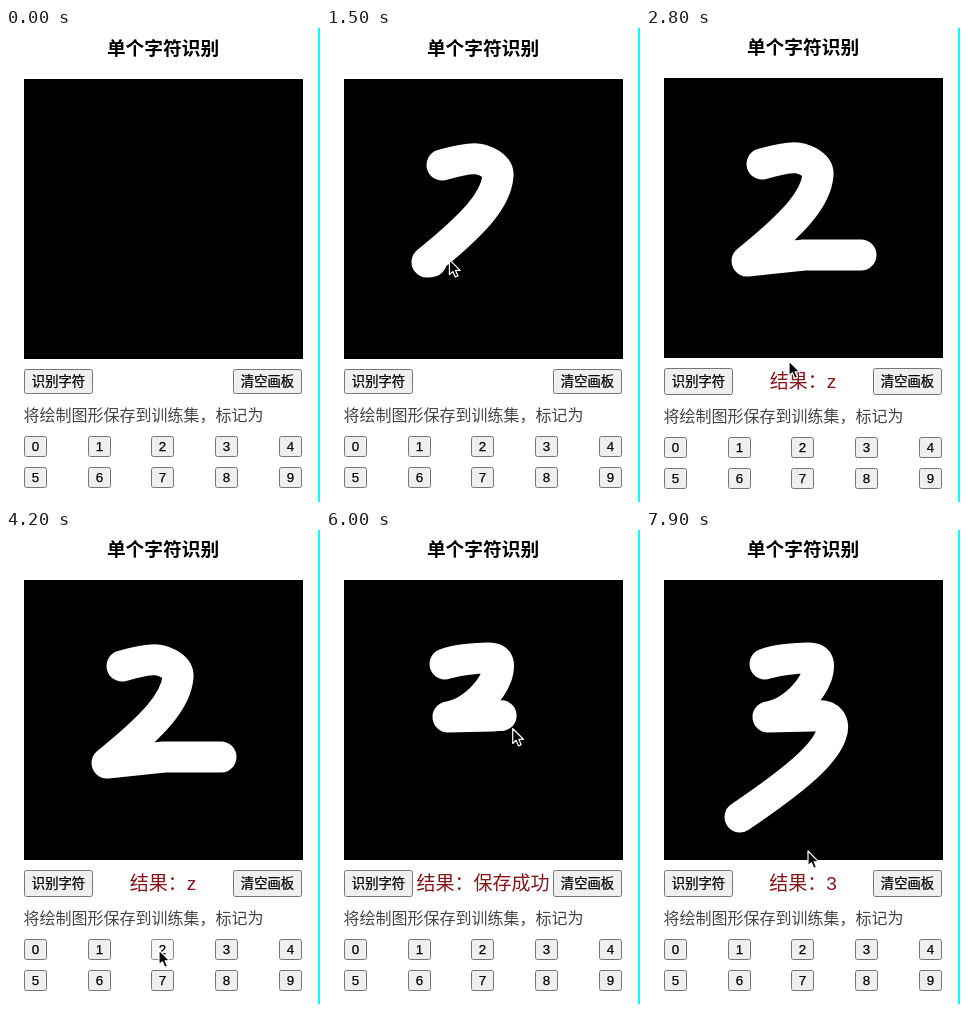
Animation, 314 px wide and 474 px high, one loop 8000 ms. Source, as an HTML page:

```html
<!DOCTYPE html>
<html lang="zh-CN">
<head>
<meta charset="utf-8">
<title>单个字符识别</title>
<style>
  html, body { margin: 0; width: 100%; height: 100%; overflow: hidden; background: #fff; }
  svg { display: block; width: 314px; height: 474px; }
  text { font-family: "Liberation Sans", "Noto Sans CJK SC", "Noto Sans CJK", sans-serif; text-anchor: middle; }
  .title { font-size: 18.72px; font-weight: bold; }
  .label { font-size: 16px; fill: #444; text-anchor: start; }
  .result { font-size: 19px; fill: #861418; }
  .button text { font-size: 13.33px; stroke: #000; stroke-width: .25; }
  .button rect { fill: #efefef; stroke: #767676; }
  .button.hover rect { fill: #e5e5e5; stroke: #4f4f4f; }
  .button.active rect { fill: #f5f5f5; stroke: #8d8d8d; }
  .pen { fill: none; stroke: #fff; stroke-width: 31; stroke-linecap: round; stroke-linejoin: round; }
  .cursor { stroke: #fff; stroke-width: 1.2; stroke-linejoin: round; }
</style>
</head>
<body>
<svg viewBox="0 0 314 474">
  <rect x="312" width="2" height="474" fill="#0ff"/>
  <g id="board">
    <text class="title" x="157" y="27">单个字符识别</text>
    <rect x="18" y="51" width="279" height="280"/>
    <path class="pen" id="two" d="M116 137C130 133 145 130 152 131S173 138 172 148C170 172 148 196 101 234L158 228H215"/>
    <path class="pen" id="three" d="M119 135C130 131 150 129 162 129S174 136 171 146C165 163 145 184 122 188L167 187C184 184 190 194 185 206C178 226 150 250 94 288"/>
  </g>
  <g id="actions"></g>
  <text class="result" id="result" x="157" y="360"></text>
  <g id="digits">
    <text class="label" x="17.5" y="393">将绘制图形保存到训练集，标记为</text>
  </g>
  <path class="cursor" id="cursor" d="M0 0V15L3.4 11.8L5.8 17.4L8.5 16.2L6.1 10.8H10.7Z"/>
</svg>
<script>
const LOOP = 8000, STEP = 100, PEN_LAG = 50, PRESS_TIME = 200;
const RESULT_AT = 2300, CLEAR_AT = 4400, SECOND_RESULT_AT = 7200;
const PRESSES = [2300, 4200, 7100];
const $ = id => document.getElementById(id);
const progress = (t, from, to) => Math.min(1, Math.max(0, (t - from) / (to - from)));
const setAttrs = (node, attrs) => Object.entries(attrs).forEach(([k, v]) => node.setAttribute(k, v));

function pen(id, from, to, hideAt) {
  const path = $(id), length = path.getTotalLength();
  return {
    from: from - PEN_LAG,
    place(_, t) {
      const { x, y } = path.getPointAtLength(length * progress(t + PEN_LAG, from, to));
      return [x, y];
    },
    draw(t) {
      path.style.visibility = t >= from && t < hideAt ? "visible" : "hidden";
      path.style.strokeDasharray = `${length * progress(t, from, to)} ${length * 2}`;
    }
  };
}

function glide(from, to, x, y) {
  return {
    from,
    place([x0, y0], t) {
      const k = progress(t, from, to), eased = k * k * (3 - 2 * k);
      return [x0 + (x - x0) * eased, y0 + (y - y0) * eased];
    }
  };
}

const two = pen("two", 1000, 1800, CLEAR_AT);
const three = pen("three", 5500, 6400, LOOP);
const moves = [
  glide(100, 950, 116, 137), two,
  glide(1850, 2200, 60, 352),
  glide(2500, 2800, 143, 333),
  glide(2900, 3900, 153, 420),
  glide(4600, 5200, 135, 259),
  glide(5200, 5450, 119, 135), three,
  glide(6400, 6500, 71, 284),
  glide(6500, 6800, 52, 352),
  glide(7300, 7700, 155, 352),
  glide(7700, 7900, 162, 321)
];
const pointerAt = t => moves.reduce((at, move) => t < move.from ? at : move.place(at, t), [250, 310]);

function addButton(parent, label, x, y, w, h) {
  const make = name => document.createElementNS("http://www.w3.org/2000/svg", name);
  const group = make("g"), rect = make("rect"), text = make("text");
  setAttrs(rect, { x: x + .5, y: y + .5, width: w - 1, height: h - 1, rx: 2 });
  setAttrs(text, { x: x + w / 2, y: y + h / 2 + 4.9 });
  text.textContent = label;
  group.append(rect, text);
  $(parent).append(group);
  return { group, rect, x, y, w, h };
}

const actions = ["识别字符", "清空画板"].map((label, i) => addButton("actions", label, 18 + i * 209, 341, 69, 25));
const digits = Array.from({ length: 10 }, (_, n) =>
  addButton("digits", n, Math.round(18 + n % 5 * 63.7), n < 5 ? 408 : 439, 23, 21));

function resultText(t) {
  if (t < RESULT_AT) return "";
  return "结果：" + (t < CLEAR_AT ? "z" : t < SECOND_RESULT_AT ? "保存成功" : "3");
}

function draw(t) {
  const [x, y] = pointerAt(t);
  two.draw(t);
  three.draw(t);
  $("result").textContent = resultText(t);
  $("cursor").setAttribute("transform", `translate(${x} ${y})`);
  $("cursor").style.visibility = t < 100 ? "hidden" : "visible";

  // The result line makes its row taller, pushing the rest apart.
  const grow = t >= RESULT_AT ? 1 : 0;
  $("board").setAttribute("transform", `translate(0 ${-grow})`);
  $("digits").setAttribute("transform", `translate(0 ${grow})`);
  for (const { rect } of actions) setAttrs(rect, { y: 341.5 - grow, height: 24 + 2 * grow });

  const pressing = PRESSES.some(p => t >= p && t < p + PRESS_TIME);
  for (const b of [...actions, ...digits]) {
    const over = x >= b.x && x <= b.x + b.w && y >= b.y && y <= b.y + b.h;
    b.group.setAttribute("class", "button" + (over ? pressing ? " active" : " hover" : ""));
  }
}

const start = performance.now();
function tick() {
  const t = (performance.now() - start) % LOOP;
  draw(Math.floor(t / STEP) * STEP);
  requestAnimationFrame(tick);
}
tick();
</script>
</body>
</html>
```
